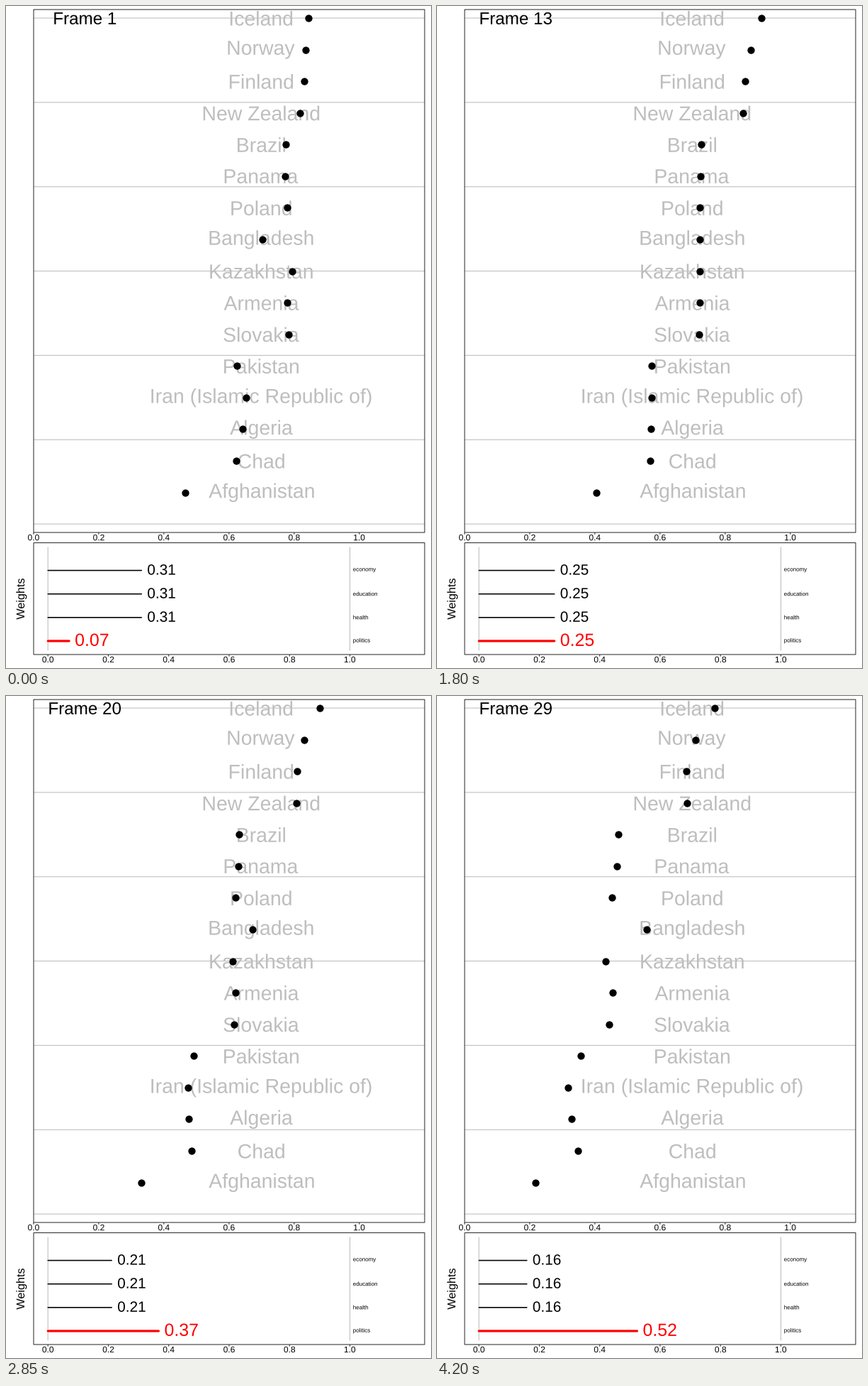
A matplotlib script for the animation above (4.35 s loop, 600x933 px).

```python
import math

import matplotlib.pyplot as plt
import numpy as np
from matplotlib.animation import FuncAnimation
from matplotlib.patches import PathPatch
from matplotlib.textpath import TextPath
from matplotlib.transforms import Affine2D

plt.rcParams["font.family"] = "Liberation Sans"
plt.rcParams["path.snap"] = False

W, H, DPI = 600, 933, 64  # a dpi of 64 keeps the size exact in pixels
PT = 72 / DPI             # points per pixel
STEPS = 29
GREY, DARK = "#bebebe", "#333333"

# name, dot position at the start and at the end of the rotation
COUNTRIES = [
    ("Iceland", 426, 391.7), ("Norway", 422.3, 364),
    ("Finland", 420.8, 351), ("New Zealand", 414.3, 352.7),
    ("Brazil", 394, 255), ("Panama", 393.7, 253),
    ("Poland", 396.8, 246.7), ("Bangladesh", 361.8, 295),
    ("Kazakhstan", 403.5, 237.3), ("Armenia", 396.2, 247),
    ("Slovakia", 399, 242.3), ("Pakistan", 325.6, 202),
    ("Iran (Islamic Republic of)", 338, 184.8), ("Algeria", 333.4, 189),
    ("Chad", 324.8, 198.8), ("Afghanistan", 252, 138.5),
]
TOPICS = ["economy", "education", "health", "politics"]

LEFT, RIGHT = 38.5, 590.5
TOP_X0, TOP_UNIT = 38.4, 459.9
BAR_X0, BAR_UNIT = 58.7, 426.3

# projection angle: start, equal weights, end
A_START, A_EQUAL, A_END = 0.13, math.pi / 6, 1.0875

fig = plt.figure(figsize=(W / DPI, H / DPI), dpi=DPI, facecolor="white")
ax = fig.add_axes([0, 0, 1, 1])
# whole numbers fall on pixel centres
ax.set_xlim(-0.5, W - 0.5)
ax.set_ylim(H - 0.5, -0.5)
ax.axis("off")


def line(xs, ys, color, width=1.07, z=1, cap="butt"):
    return ax.plot(xs, ys, color=color, lw=width * PT, zorder=z,
                   solid_capstyle=cap)[0]


def outline(s, size, x, y, ha="left", va="baseline", turn=0):
    """Glyph outlines of s; centring goes by the ink."""
    path = TextPath((0, 0), s, size=size)
    path = Affine2D().scale(1, -1).rotate_deg(-turn).transform_path(path)
    box = path.get_extents()
    dx = x - (box.x0 + box.x1) / 2 if ha == "center" else x
    dy = y - (box.y0 + box.y1) / 2 if va == "center" else y
    return Affine2D().translate(dx, dy).transform_path(path)


def text(s, size, x, y, color="black", z=3, **kw):
    patch = PathPatch(outline(s, size, x, y, **kw), facecolor=color, lw=0,
                      zorder=z)
    return ax.add_patch(patch)


def panel(top, bottom, x0, unit):
    line([LEFT, RIGHT, RIGHT, LEFT, LEFT],
         [top, top, bottom, bottom, top], DARK, z=6)
    for k in range(6):
        x = x0 + unit * k / 5
        line([x, x], [bottom, bottom + 2.75], DARK, z=6)
        text(f"{k / 5:.1f}", 12, x, bottom + 7, ha="center", va="center")


panel(4.5, 741.5, TOP_X0, TOP_UNIT)
panel(756, 913.5, BAR_X0, BAR_UNIT)

for k in range(7):
    y = 16.5 + 118.85 * k
    line([LEFT, RIGHT], [y, y], GREY)
for x in (BAR_X0, BAR_X0 + BAR_UNIT):
    line([x, x], [762, 908], GREY)

dot_y = 16.5 + 44.57 * np.arange(len(COUNTRIES))
for (name, _, _), y in zip(COUNTRIES, dot_y):
    text(name, 28.45, 360, y + 0.3, GREY, 2, ha="center", va="center")
text("Weights", 16.2, 21.3, 835.3, ha="center", va="center", turn=90)
title = text("Frame 1", 24.2, 111.2, 25.2, ha="center")

rows = 795 + 33.15 * np.arange(len(TOPICS))
bars, values = [], []
for topic, y in zip(TOPICS, rows):
    main = topic == "politics"
    color = "red" if main else "black"
    bars.append(line([BAR_X0, BAR_X0], [y, y], color, 3.2 if main else 1.6,
                     4, "round"))
    values.append(text("0", 20.8, BAR_X0, y, color))
    text(topic, 8, 489.3, y - 0.3, va="center")

first = np.array([c[1] for c in COUNTRIES]) - TOP_X0
final = np.array([c[2] for c in COUNTRIES]) - TOP_X0
dots = ax.scatter(first + TOP_X0, dot_y, s=(10.3 * PT) ** 2, c="black", lw=0,
                  zorder=5)


def angle(i):
    """Two even sweeps; each one rests a step on its last angle."""
    if i < 12:
        return A_START + (A_EQUAL - A_START) * min(i, 11) / 11
    return A_EQUAL + (A_END - A_EQUAL) * min(i - 12, 15) / 15


def draw(i):
    a = angle(i)
    title.set_path(outline(f"Frame {i + 1}", 24.2, 111.2, 25.2, ha="center"))

    # every score is a turning projection, so blend along the arc
    xs = first * math.sin(A_END - a) + final * math.sin(a - A_START)
    xs = TOP_X0 + xs / math.sin(A_END - A_START)
    dots.set_offsets(np.column_stack([xs, dot_y]))

    total = math.sqrt(3) * math.cos(a) + math.sin(a)
    politics = math.sin(a) / total
    weights = [(1 - politics) / 3] * 3 + [politics]
    for k, w in enumerate(weights):
        end = BAR_X0 + BAR_UNIT * w
        bars[k].set_xdata([BAR_X0, end])
        size, drop = (24.9, 6.9) if k == 3 else (20.8, 6)
        values[k].set_path(outline(f"{round(w, 2):g}", size, end + 8,
                                   rows[k] + drop))
    return [title, dots, *bars, *values]


anim = FuncAnimation(fig, draw, frames=STEPS, interval=150, repeat=True,
                     repeat_delay=0)
plt.show()
```
